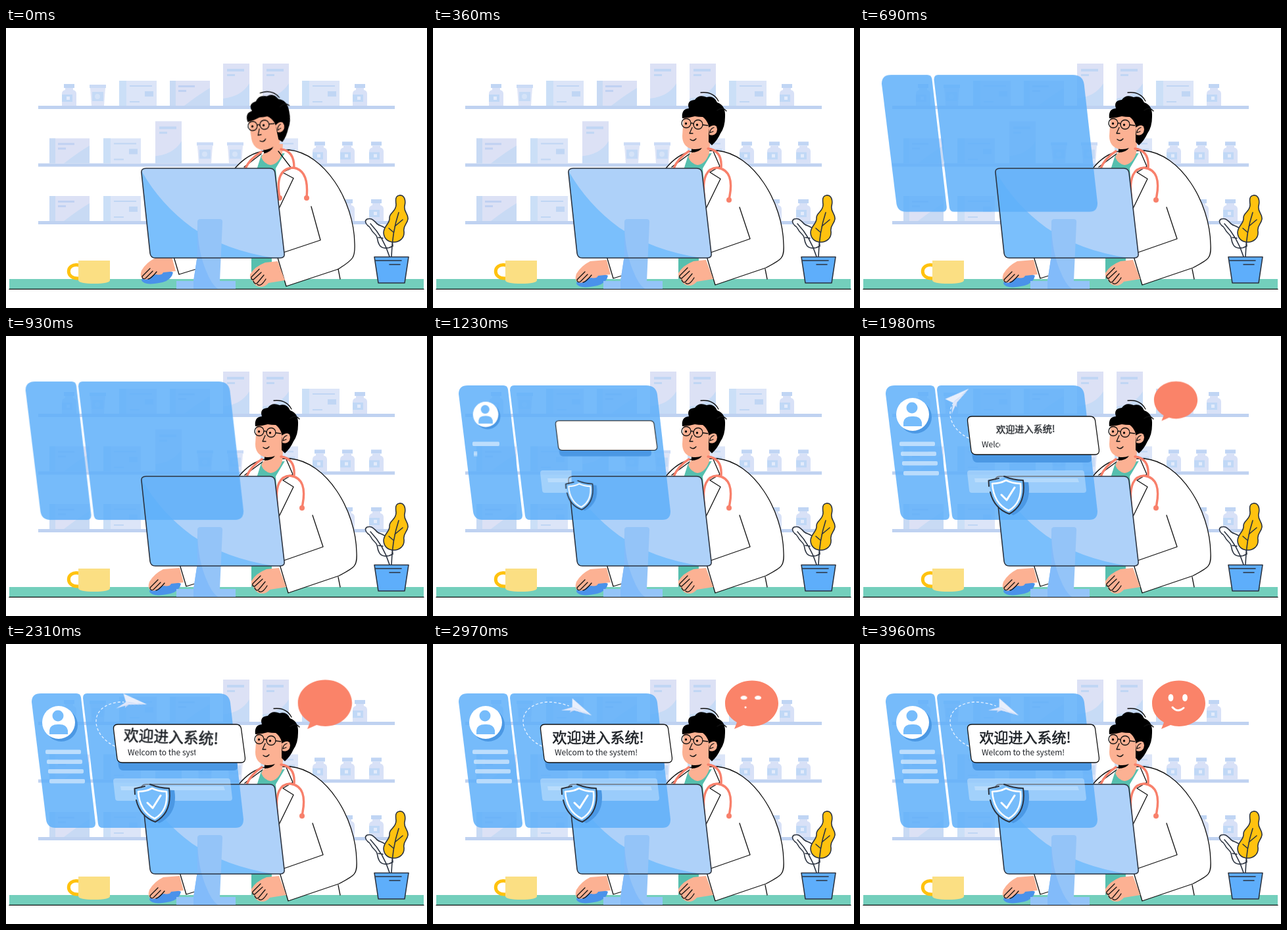
An HTML page that plays this animation: 640 by 425 pixels, repeating every 4.5 s.

```html
<!DOCTYPE html>
<html lang="zh">
<head>
<meta charset="utf-8">
<title>Pharmacy welcome</title>
<style>
html,body{margin:0;width:100%;height:100%;overflow:hidden;background:#fff}
svg{display:block;width:640px;height:425px}
.line{fill:none;stroke:#111;stroke-width:1.3;stroke-linecap:round;stroke-linejoin:round}
.thin{fill:none;stroke:#2b3340;stroke-width:1.6;stroke-linecap:round;stroke-linejoin:round}
.skin{fill:#fcb193}
.tube{fill:none;stroke:#f8806b;stroke-width:3.4;stroke-linecap:round}
.glass{fill:#76bcfb}

[class*="a-"]{animation:4.5s linear infinite both}
.a-morph{d:var(--b);animation-name:morph}
.a-lean{animation-name:lean}
.a-panel{transform-origin:361px 279px;animation-name:panel}
.a-pop{transform-origin:var(--o);animation-name:pop}
.a-l1{animation-name:l1}.a-l2{animation-name:l2}.a-l3{animation-name:l3}.a-l4{animation-name:l4}
.row rect{transform-box:fill-box;transform-origin:0 50%}
.a-bar{animation-name:bar}
.a-check{stroke-dasharray:100;animation-name:check}
.a-trail{stroke-dasharray:100;animation-name:trail}
.a-plane{offset-path:path("M172 158C128 142 122 92 174 88Q196 88 218 99");offset-rotate:auto;animation-name:plane}
.a-title{transform-origin:253px 142px;animation-name:title}
.a-type{animation-name:type}
.a-bubble{transform-origin:460px 128px;animation-name:bubble}
.a-eye{transform-box:fill-box;transform-origin:center;animation-name:eye}
.a-smile{stroke-dasharray:100 200;animation-name:smile}

/* doctor straightens up, 30-360 ms */
@keyframes morph{0%,.6%{d:var(--a);animation-timing-function:ease-in-out}8%,100%{d:var(--b)}}
@keyframes lean{0%,.6%{transform:var(--p);animation-timing-function:ease-in-out}8%,100%{transform:none}}
/* panels grow out of the monitor */
@keyframes panel{
  0%,10.8%{transform:scale(0);animation-timing-function:cubic-bezier(.22,.61,.36,1)}
  16.9%{transform:scale(1.045);animation-timing-function:ease-in-out}
  26%,100%{transform:none}}
@keyframes pop{
  0%,23.3%{transform:scale(0);animation-timing-function:ease-out}
  30.7%{transform:scale(1.05);animation-timing-function:ease-in-out}
  34%,100%{transform:scale(1)}}
@keyframes l1{0%,24.7%{transform:scaleX(0)}28.2%,100%{transform:scaleX(1)}}
@keyframes l2{0%,27%{transform:scaleX(0)}30.6%,100%{transform:scaleX(1)}}
@keyframes l3{0%,29.1%{transform:scaleX(0)}32.6%,100%{transform:scaleX(1)}}
@keyframes l4{0%,31%{transform:scaleX(0)}34.4%,100%{transform:scaleX(1)}}
@keyframes bar{0%,25.2%{clip-path:inset(0 100% 0 0)}33.4%,100%{clip-path:inset(0 0 0 0)}}
@keyframes check{0%,35.3%{stroke-dashoffset:100;opacity:0}35.4%{opacity:1}43%,100%{stroke-dashoffset:0;opacity:1}}
@keyframes trail{0%,34%{stroke-dashoffset:100;animation-timing-function:ease-out}62%,100%{stroke-dashoffset:8}}
@keyframes plane{
  0%,33.9%{offset-distance:0%;opacity:0}
  34%{offset-distance:0%;opacity:1;animation-timing-function:ease-out}
  62%,100%{offset-distance:100%;opacity:1}}
@keyframes title{
  0%,41%{transform:scale(0) rotate(-8deg);animation-timing-function:ease-out}
  48%{transform:scale(1.06) rotate(4deg);animation-timing-function:ease-in-out}
  55.5%,100%{transform:scale(1) rotate(0deg)}}
@keyframes type{0%,41.3%{clip-path:inset(0 100% 0 0)}53.6%,100%{clip-path:inset(0 0 0 0)}}
@keyframes bubble{
  0%,40%{transform:scale(0);animation-timing-function:ease-out}
  46.7%{transform:scale(1.04);animation-timing-function:ease-in-out}
  55%,100%{transform:scale(1)}}
@keyframes eye{
  0%,58.6%{transform:scale(0);animation-timing-function:ease-out}
  62%,66%{transform:scale(1.3,.55);animation-timing-function:ease-in-out}
  73.3%{transform:scale(1);animation-timing-function:ease-in-out}
  80.6%{transform:scale(1.3,.55);animation-timing-function:ease-in-out}
  88%,100%{transform:scale(1)}}
@keyframes smile{
  0%,65.8%{stroke-dashoffset:100;opacity:0}
  65.9%{stroke-dashoffset:99;opacity:1;animation-timing-function:ease-in-out}
  77.3%,100%{stroke-dashoffset:0;opacity:1}}
</style>
</head>
<body>
<svg viewBox="0 0 640 425">
<defs>
  <!-- shelf goods stand on y = 0 -->
  <g id="bottle">
    <path fill="#c0d5f4" d="M-8-33H8V-27H-8z"/>
    <path fill="#d8e1f7" d="M-6-27H6V-24Q11-23 11-18V0H-11V-18Q-11-23-6-24z"/>
    <path fill="#c0d8f6" d="M-11-17H5V-6H-11z"/>
    <path fill="#e3ebfb" d="M-4-14H1V-9H-4z"/>
  </g>
  <g id="jar">
    <path fill="#cbdbf6" d="M-12-32H13V-27H-12z"/>
    <path fill="#dde4f7" d="M-11-27H12L10 0H-9z"/>
    <path fill="#c5daf6" d="M-8-21H9V-7H-8z"/>
    <circle cy="-14" r="4" fill="#d5e3f8"/>
  </g>
  <g id="carton">
    <path fill="#dce5f8" d="M0-38H57V0H0z"/>
    <path fill="#cbdff7" d="M0-38H11V0H0z"/>
    <path fill="#c0d6f4" d="M16-31H50V-29H16zM39-22H52V-14H39zM16-7H31V-5H16z"/>
  </g>
  <g id="pack">
    <path fill="#dce1f5" d="M0-38H61V0H0z"/>
    <path fill="#c5daf5" d="M61-27Q44-17 22 0H61zM0-38H9V0H0z" opacity=".85"/>
    <path fill="#c0d1f2" d="M13-31H38V-28H13zM13-24H25V-21H13z"/>
  </g>
  <g id="tall">
    <path fill="#dce1f5" d="M0-64H40V0H0z"/>
    <path fill="#c7dbf6" d="M40-34Q28-14 0-11V0H40z"/>
    <path fill="#c0d6f4" d="M6-56H32V-52H6zM6-48H18V-45H6z"/>
  </g>
  <mask id="drawn" maskUnits="userSpaceOnUse" x="100" y="60" width="160" height="120">
    <path class="a-trail" pathLength="100" fill="none" stroke="#fff" stroke-width="6" d="M172 158C128 142 122 92 174 88Q196 88 218 99"/>
  </mask>
  <path id="screen" d="M213 213H401Q408 213 409 220L423 342Q424 349 417 349H227Q220 349 219 342L206 220Q205 213 213 213z"/>
</defs>

<g id="shelves">
  <path fill="#bfd2f1" d="M49 118H591V123H49zM49 205.500H591V210.500H49zM49 293H591V298H49z"/>
  <g transform="translate(0 118)">
    <use href="#bottle" x="96"/><use href="#jar" x="139"/><use href="#carton" x="172"/><use href="#pack" x="249"/>
    <use href="#tall" x="330"/><use href="#tall" x="390"/><use href="#carton" x="450"/><use href="#bottle" x="538"/>
  </g>
  <g transform="translate(0 205.500)">
    <use href="#pack" x="66"/><use href="#carton" x="148"/><use href="#tall" x="227"/><use href="#jar" x="302"/><use href="#jar" x="348"/>
    <use href="#carton" x="387"/><use href="#bottle" x="477"/><use href="#bottle" x="519"/><use href="#bottle" x="563"/>
  </g>
  <g transform="translate(0 293)">
    <use href="#pack" x="66"/><use href="#carton" x="148"/><use href="#bottle" x="519"/><use href="#bottle" x="563"/>
  </g>
</g>

<g id="desk">
  <path fill="#73cfbc" d="M5 381H635V396H5z"/>
  <path class="line" d="M5 396.400H635"/>
  <path fill="none" stroke="#ffc20f" stroke-width="5" d="M111 360C90 356 90 382 111 380"/>
  <path fill="#fbdf83" d="M110 353H158V383Q157 388 134 388Q111 388 110 383z"/>
</g>

<g id="plant" class="thin">
  <path style="fill:#fff" d="M549 290C556 288 559 292 563 296C566 301 574 299 578 306C584 312 588 322 588 331C580 336 570 335 567 328C563 321 567 318 560 312C553 306 556 303 550 300C546 296 545 292 549 290z"/>
  <path d="M554 297Q574 318 583 347M573 319L566 318"/>
  <path style="fill:#ffc20f" d="M598 254C606 253 608 262 606 270C604 279 612 282 611 290C610 298 603 300 605 309C606 320 597 325 590 325C580 325 574 319 574 310C575 299 584 297 583 288C583 280 593 279 593 268C592 260 592 255 598 254z"/>
  <path d="M597 280Q587 310 586 347M591 301L603 291M589 310L582 304"/>
  <path style="fill:#5eaefb" d="M560 347.500H612L606 387H566z"/>
  <path d="M562 353H601M583 359H599"/>
</g>

<g id="doctor">
  <path class="line a-morph" style="fill:#fff;--a:path('M348 213Q368 190 392 187L430 185C484 190 529 262 530 327C531 348 529 351 505 366L426 392L411 342L360 340z');--b:path('M354 213Q372 191 394 187L432 186C487 191 532 264 533 329C534 349 531 351 506 364L429 390L414 340L360 340z')"/>
  <path class="line" d="M505 366L508 381"/>
  <path class="line a-morph" style="--a:path('M464 271L478 322L415 343');--b:path('M466 272L482 320L416 343')"/>
  <path fill="#56bfae" d="M381 215L388 193L424 190L419 220L404 270V381H373V270z"/>
  <path fill="#fff" d="M425 188L437 210L421 222L436 229L415 274L410 213z"/>
  <path class="skin" d="M392 176H421L420 190Q414 207 402 208Q392 206 388 196L393 188z"/>
  <path class="line a-morph" style="--a:path('M388 191L362 211M414 187L434 213L420 219L437 228L415 274');--b:path('M390 191L363 211M426 187L436 210L421 219L437 229L415 274')"/>
  <path class="tube a-morph" style="--a:path('M388 188Q370 199 364 213M418 184Q438 186 438 212M416 258Q408 213 437 212Q461 216 457 257');--b:path('M389 187Q372 198 366 213M418 183Q440 186 438 212M412 255Q408 213 432 212Q460 216 450 260')"/>
  <circle class="a-lean" style="--p:translate(7px,-3px)" cx="450" cy="261" r="4" fill="#f8806b"/>
  <circle class="a-lean" style="--p:translate(8px,3px)" cx="408" cy="255" r="4" fill="#f8806b"/>

  <g class="a-lean" style="--p:translate(-1px,0) rotate(-12.5deg);transform-origin:400px 188px">
    <path class="skin" d="M381 132L379 164Q379 180 394 184L407 185Q420 184 421 174L434 150L425 130z"/>
    <path d="M393 183.500Q402 185 409 182Q404 189 393 189z"/>
    <path d="M379 137Q377 123 389 122Q385 110 398 109Q404 100 416 105Q427 102 432 113Q445 117 444 135Q444 150 437 160Q432 171 424 178L419 173L419 148Q416 139 410 135Q403 135 398 134Q388 137 379 137z"/>
    <path class="line" d="M407 98Q426 96 434 111M432 125Q440 119 446 126"/>
    <path class="skin" d="M419 151Q431 143 432 154Q431 165 420 162z"/>
    <path class="line" d="M427 151Q421 153 421 159L426 157M394 151L390 160H395M391 169Q396 173 400 168M410 147L418 148"/>
    <g class="line"><circle cx="385" cy="144.500" r="7"/><circle cx="403" cy="146.500" r="7"/><path d="M392 145Q394 143 396 146"/></g>
    <circle cx="384.500" cy="145" r="1.700"/><circle cx="401.500" cy="147" r="1.700"/>
  </g>

  <g class="a-lean" style="--p:translate(-2px,2px)">
    <path class="skin" d="M415 352L396 354Q380 360 373 372Q372 378 377 382Q380 391 391 391Q397 390 401 385L426 381z"/>
    <path class="line" d="M387 364L375 376Q374 380 378 380L390 369M378 382Q380 388 384 385L394 373M384 387Q389 392 397 379"/>
  </g>

  <path class="line a-lean" style="fill:#fff;--p:translate(-11px,-6px)" d="M300 340H262L274 380L300 372"/>
  <g class="a-lean" style="--p:translate(-12px,-5px)">
    <path fill="#4a92ea" d="M218 388Q219 379 240 374Q258 371 266 376Q264 387 250 391Q222 397 218 388z"/>
    <path class="skin" d="M264 352L239 354Q225 361 218 373Q215 382 219 385Q225 389 231 384Q234 380 240 379Q249 381 251 376L270 374z"/>
    <path class="line" d="M231 370L219 382Q219 387 224 385L235 374M228 386Q232 386 241 375"/>
  </g>
</g>

<g id="monitor">
  <use href="#screen" fill="#aed1f9"/>
  <path fill="#7abffc" d="M206 217Q235 268 283 303Q334 338 408 349H227Q220 349 219 342z"/>
  <path fill="#94c4f8" d="M291 294Q291 290 296 290H325Q330 290 329 296L325 384H349V396H259V384H285L291 345z"/>
  <path fill="#82bbfa" d="M291 300Q292 340 304 368Q312 389 322 396H285V384L291 345z"/>
</g>

<g class="a-panel">
  <g fill="#5eb0fa" opacity=".85">
    <path d="M53 75H107Q113 75 114 81L136 272Q136 279 130 279H75Q63 279 61 267L39 88Q39 75 53 75z"/>
    <path d="M123 75H324Q339 75 341 89L361 266Q361 279 349 279H147Q141 279 140 273L117 82Q117 75 123 75z"/>
  </g>
</g>
<use href="#screen" class="thin"/>

<g class="a-pop" style="--o:80px 119px">
  <circle cx="84" cy="123" r="25" fill="#4b98e4"/>
  <circle cx="80" cy="119" r="25" fill="#fff"/>
  <g class="glass"><circle cx="79" cy="109" r="8.500"/><path d="M66 137V131Q67 122 79 122Q92 121 94 131V137z"/></g>
</g>
<g class="row" fill="#fff" fill-opacity=".52">
  <rect class="a-l1" x="60" y="160.500" width="54" height="6.500" rx="2"/>
  <rect class="a-l2" x="62" y="175.500" width="54" height="6.500" rx="2"/>
  <rect class="a-l3" x="64" y="190" width="54" height="6.500" rx="2"/>
  <rect class="a-l4" x="66" y="205" width="54" height="6.500" rx="2"/>
</g>

<g class="a-bar" fill="#fff">
  <path fill-opacity=".32" d="M167 204H337Q341 204 341 208L344 234Q344 238 340 238H170Q166 238 166 234L163 208Q163 204 167 204z"/>
  <path fill-opacity=".25" d="M174 216H331L333 222H175z"/>
</g>

<path mask="url(#drawn)" fill="none" stroke="#e8f2ff" stroke-width="1.300" stroke-dasharray="4 3" d="M172 158C128 142 122 92 174 88Q196 88 218 99"/>
<g class="a-plane">
  <path fill="#e9effc" d="M25-2L-13-12L-7 0z"/>
  <path fill="#c4d5f4" d="M25-2L-7 0L-7 9L-2 3z"/>
  <path fill="#dfe7fa" d="M25-2L-2 3L-20 12L-7 0z"/>
</g>

<g class="a-pop" style="--o:263.500px 151px">
  <path fill="#4b98e4" d="M166 145H346L352 184Q353 192 346 192H178Q172 192 171 185z"/>
  <path class="line" style="fill:#fff" d="M170 122H350Q356 122 357.500 128L363.500 173Q364 180 357 180H177Q170 180 169 174L163.500 129Q163 122 170 122z"/>
</g>
<g fill="#1f2328" font-family="'Noto Sans CJK SC','Noto Sans CJK',sans-serif">
  <text class="a-title" x="181.500" y="149.500" font-size="22" stroke="#1f2328" stroke-width=".6">欢迎进入系统!</text>
  <text class="a-type" x="185" y="169" font-size="12">Welcom to the system!</text>
</g>

<g class="a-pop" style="--o:223px 242px">
  <path fill="#4b98e4" d="M229 217Q242 222 256 222Q262 257 233 272Q208 262 204 226z"/>
  <path class="glass" d="M222 213Q234 219 248 219Q253 256 227 270Q199 259 196 220Q211 219 222 213z"/>
  <path class="thin" style="stroke-width:2" d="M219 213Q234 219 248 219Q253 256 227 270Q204 262 198 237M211 216L195.500 219.500L196 228"/>
  <path fill="none" stroke="#fff" stroke-width="2.600" stroke-linejoin="round" d="M222 219Q232 224 244 224Q247 253 226 265Q203 254 201 224Q213 224 222 219z"/>
</g>
<path class="a-check" pathLength="100" fill="none" stroke="#fff" stroke-width="3" stroke-linecap="round" stroke-linejoin="round" d="M215 241L223 249L235 230"/>

<g class="a-bubble">
  <path fill="#fa8369" d="M462 119C449 111 444 101 444 90C444 71 462 55.500 485 55.500S525 71 525 90S507 125 485 125Q478 125 472 123L458 129z"/>
</g>
<g fill="#fff">
  <ellipse class="a-eye" cx="472.500" cy="81.500" rx="3.900" ry="5.500"/>
  <ellipse class="a-eye" cx="494" cy="81.500" rx="3.900" ry="5.500"/>
</g>
<path class="a-smile" pathLength="100" fill="none" stroke="#fff" stroke-width="3" stroke-linecap="round" d="M475 96Q483 105 492 97"/>
</svg>
</body>
</html>
```
